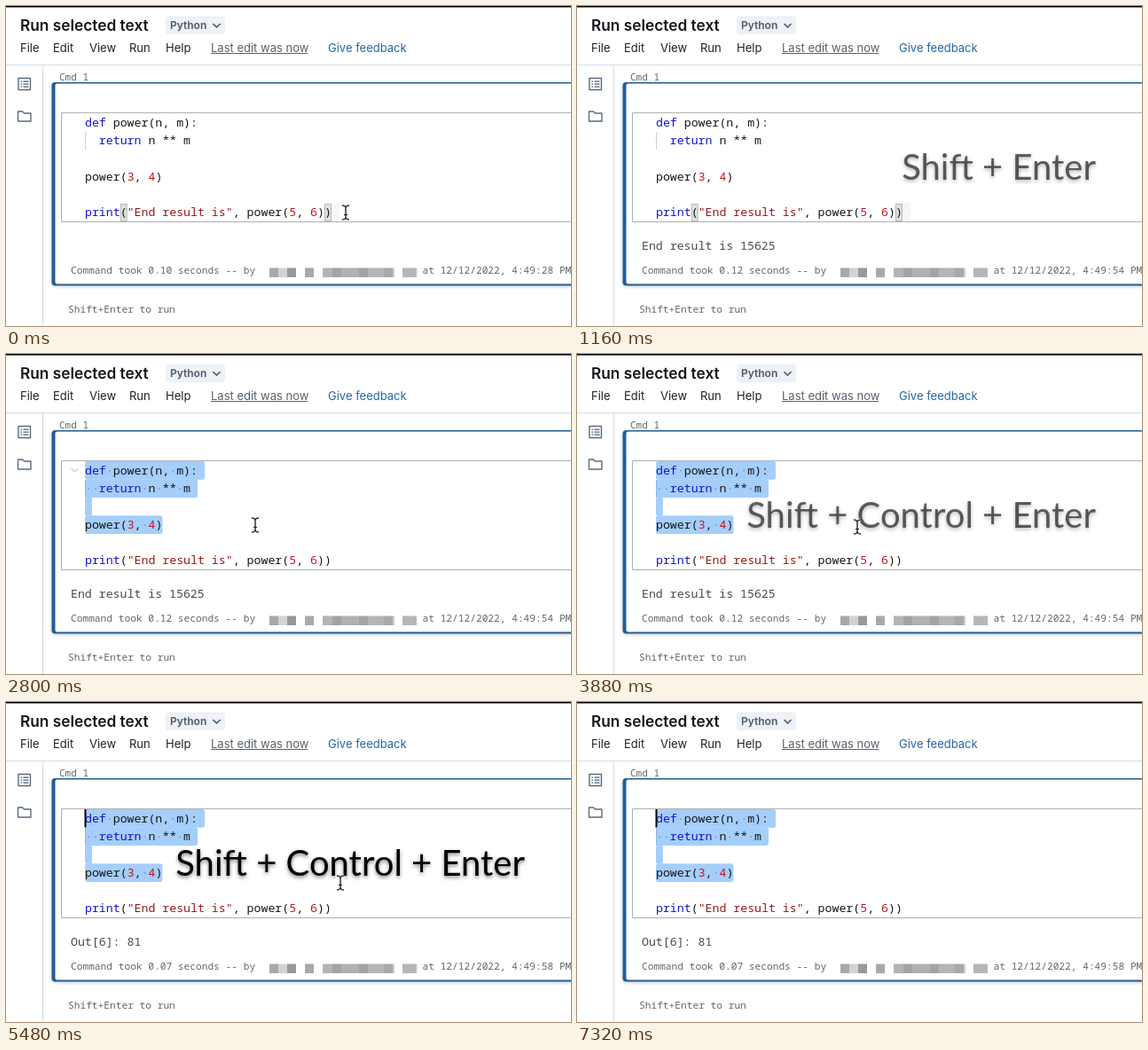
Write an HTML page with a canvas that moves like this. It is 637 px wide and 361 px high and loops after 7.44 s.

```html
<!DOCTYPE html>
<html lang="en">
<head>
<meta charset="utf-8">
<title>Run selected text</title>
<style>
html, body { margin: 0; width: 100%; height: 100%; overflow: hidden; background: #fff; }
canvas { display: block; width: 637px; height: 361px; }
</style>
</head>
<body>
<canvas id="stage" width="637" height="361"></canvas>
<script>
const ctx = document.getElementById('stage').getContext('2d');
const LOOP = 7440;
const MONO = '"Noto Sans Mono", "DejaVu Sans Mono", monospace';
const UI = 'Inter, Roboto, sans-serif';
const CODE_X = 89, CODE_Y = 121, LINE_H = 20.4, CHAR_W = 7.94;
const RUN_1 = 800, RUN_2 = 4600;
const DRAG_START = 1960, DRAG_END = 2360;

const BLUE = '#1414c8', RED = '#c8141e', STRING = '#981919', BLACK = '#161616';
// Each line is a list of [text, colour] runs.
const LINES = [
  [['def', BLUE], [' power(n, m):', BLACK]],
  [['  return', BLUE], [' n ** m', BLACK]],
  [],
  [['power(', BLACK], ['3', RED], [', ', BLACK], ['4', RED], [')', BLACK]],
  [],
  [['print', BLUE], ['(', BLACK], ['"End result is"', STRING], [', power(', BLACK],
   ['5', RED], [', ', BLACK], ['6', RED], ['))', BLACK]]
];
const PLAIN = LINES.map(runs => runs.map(r => r[0]).join(''));

// Pointer path: time, x, y
const PATH = [
  [0, 383, 233], [1480, 383, 233], [1800, 174, 187], [DRAG_START, 177, 191],
  [DRAG_END, 88, 131], [2480, 82, 131], [2800, 281, 193], [3300, 316, 195],
  [4700, 316, 195], [5400, 377, 204], [LOOP, 377, 204]
];

const clamp = (v, lo, hi) => Math.max(lo, Math.min(hi, v));
const ramp = (t, a, b) => clamp((t - a) / (b - a), 0, 1);
const smooth = p => p * p * (3 - 2 * p);
const fade = (t, a, b, c, d) => Math.min(ramp(t, a, b), 1 - ramp(t, c, d));

function rect(x, y, w, h, color) {
  ctx.fillStyle = color;
  ctx.fillRect(x, y, w, h);
}

function round(x, y, w, h, r, color) {
  ctx.fillStyle = color;
  ctx.beginPath();
  ctx.roundRect(x, y, w, h, r);
  ctx.fill();
}

function line(points, color, width = 1) {
  ctx.strokeStyle = color;
  ctx.lineWidth = width;
  ctx.beginPath();
  points.forEach(([x, y], i) => i ? ctx.lineTo(x, y) : ctx.moveTo(x, y));
  ctx.stroke();
}

function text(str, x, y, font, color) {
  ctx.font = font;
  ctx.fillStyle = color;
  ctx.fillText(str, x, y);
}

function drawHeader() {
  rect(0, 0, 637, 1.5, '#000');
  text('Run selected text', 16, 28, `600 17.3px ${UI}`, '#11171c');
  round(180, 11.5, 67, 20.5, 4, '#eef1f5');
  text('Python', 185, 26, `600 12px ${UI}`, '#4b5b6b');
  line([[233.5, 20], [237.5, 24], [241.5, 20]], '#4b5b6b', 1.7);
  const menu = [['File', 16], ['Edit', 53], ['View', 94], ['Run', 139], ['Help', 180]];
  for (const [name, x] of menu) text(name, x, 51.5, `13px ${UI}`, '#1c2329');
  text('Last edit was now', 231, 51.5, `13px ${UI}`, '#56616c');
  rect(231, 53, 109, 1, '#56616c');
  text('Give feedback', 363, 51.5, `13px ${UI}`, '#2566a5');
  rect(0, 66, 637, 1, '#d5dbe4');
}

function drawSidebar() {
  rect(41, 67, 1, 294, '#d5dbe4');
  ctx.strokeStyle = '#5a6b7d';
  ctx.lineWidth = 1.4;
  ctx.strokeRect(14, 81.5, 13.5, 13);
  for (let y = 85; y < 93; y += 3) {
    rect(16.5, y - 0.6, 1.6, 1.4, '#5a6b7d');
    rect(19.5, y - 0.6, 6, 1.4, '#5a6b7d');
  }
  ctx.lineJoin = 'round';
  ctx.beginPath();
  ctx.moveTo(13.5, 119);
  ctx.lineTo(18.5, 119);
  ctx.lineTo(20.5, 121);
  ctx.lineTo(28, 121);
  ctx.lineTo(28, 130);
  ctx.lineTo(13.5, 130);
  ctx.closePath();
  ctx.stroke();
}

function drawCell() {
  text('Cmd 1', 60, 83.5, `11px ${MONO}`, '#666');
  ctx.save();
  ctx.shadowColor = 'rgba(0,0,0,.22)';
  ctx.shadowBlur = 4;
  ctx.shadowOffsetY = 1;
  round(51.5, 86, 600, 229.5, 4, '#225d94');
  ctx.restore();
  round(55.5, 87.5, 600, 226, 2, '#fff');
  ctx.strokeStyle = '#b0b0b0';
  ctx.lineWidth = 1;
  ctx.strokeRect(62.5, 120.5, 600, 123);
  text('Shift+Enter to run', 70, 346, `11.2px ${MONO}`, '#666');
}

// Blurred-out user name
function drawMosaic() {
  const blocks = [
    [297, 10, '#a8a8a8'], [307, 10, '#d3d3d3'], [317, 10, '#999'],
    [337, 10, '#a9a9a9'], [357, 11, '#b4b4b4'], [368, 10, '#a3a3a3'],
    [378, 20, '#b1b1b1'], [398, 10, '#a4a4a4'], [408, 18, '#b5b5b5'],
    [426, 10, '#a9a9a9'], [436, 2, '#ccc'], [447, 16, '#b6b6b6']
  ];
  for (const [x, w, color] of blocks) rect(x, 295.5, w, 10.5, color);
}

function drawOutput(t) {
  const [out, took, sec] = t < RUN_1 ? ['', '0.10', '28']
    : t < RUN_2 ? ['End result is 15625', '0.12', '54']
    : ['Out[6]: 81', '0.07', '58'];
  text(out, 73, 274.5, `13.23px ${MONO}`, '#4a4a4a');
  const small = `11.2px ${MONO}`;
  text(`Command took ${took} seconds -- by`, 73, 302, small, '#666');
  text(`at 12/12/2022, 4:49:${sec} PM`, 469.5, 302, small, '#666');
  drawMosaic();
}

function pointer(t) {
  let i = 1;
  while (i < PATH.length - 1 && t > PATH[i][0]) i++;
  const [t0, x0, y0] = PATH[i - 1], [t1, x1, y1] = PATH[i];
  const p = smooth(ramp(t, t0, t1));
  return [x0 + (x1 - x0) * p, y0 + (y1 - y0) * p];
}

function caretPlace(t) {
  if (t < DRAG_START) return [5, PLAIN[5].length];
  const [x, y] = pointer(Math.min(t, DRAG_END));
  const row = clamp(Math.floor((y - CODE_Y) / LINE_H), 0, 3);
  return [row, clamp(Math.round((x - CODE_X) / CHAR_W), 0, PLAIN[row].length)];
}

function drawSelection(row, col) {
  for (let i = row; i < 4; i++) {
    const from = i === row ? col : 0;
    const to = PLAIN[i].length + (i < 3 ? 1 : 0);
    const x = CODE_X + from * CHAR_W, y = CODE_Y + i * LINE_H;
    round(x, y, (to - from) * CHAR_W, LINE_H + 0.3, 2.5, '#a5cefa');
    for (let c = from; c < PLAIN[i].length; c++) {
      if (PLAIN[i][c] === ' ')
        rect(CODE_X + (c + 0.5) * CHAR_W - 0.8, y + 10, 1.6, 1.6, '#7898b8');
    }
  }
}

function drawBracket(col) {
  const x = CODE_X + col * CHAR_W;
  rect(x, 223, 8, 20, '#b9b9b9');
  rect(x + 1, 224, 6, 18, '#dfe1df');
}

function drawCode(t) {
  const [row, col] = caretPlace(t);
  if (t >= DRAG_START) {
    drawSelection(row, col);
  } else {
    rect(367, 222, 9, 21, '#f4f6fa');
    drawBracket(5);
    drawBracket(34);
  }
  rect(89, 142, 1, 20, t < DRAG_START ? '#d0d0d0' : '#93b6da');
  LINES.forEach((runs, i) => {
    let c = 0;
    for (const [str, color] of runs) {
      text(str, CODE_X + c * CHAR_W, 135.7 + i * LINE_H * 0.995, `13.23px ${MONO}`, color);
      c += str.length;
    }
  });
  const hover = fade(t, 2360, 2480, 2760, 3160);
  if (hover > 0) {
    ctx.globalAlpha = hover;
    line([[73.5, 129], [77.5, 133], [81.5, 129]], '#c8ccd0', 1.2);
    ctx.globalAlpha = 1;
  }
  const odd = Math.floor(t / 500) % 2 === 1;
  if (odd === (t < DRAG_START))
    rect(CODE_X + col * CHAR_W - 0.5, CODE_Y + row * LINE_H, 2, 20.5, '#000');
}

function drawKeys(str, alpha) {
  if (alpha <= 0) return;
  ctx.save();
  ctx.globalAlpha = alpha;
  ctx.textAlign = 'right';
  ctx.shadowColor = 'rgba(0,0,0,.5)';
  ctx.shadowBlur = 4;
  ctx.shadowOffsetY = 2;
  text(str, 585, 195.5, '40px Lato, "Open Sans", sans-serif', '#000');
  ctx.restore();
}

function drawPointer(t) {
  if (t > 600 && t < 1480 || t > 6300) return;
  const [x, y] = pointer(t);
  for (const [color, width] of [['#fff', 3], ['#222', 1.4]]) {
    line([[x, y - 6.5], [x, y + 6.5]], color, width);
    for (const s of [-1, 1])
      line([[x - 4, y + s * 8], [x - 1.5, y + s * 7.6], [x, y + s * 6.2],
            [x + 1.5, y + s * 7.6], [x + 4, y + s * 8]], color, width);
  }
  line([[x - 2, y + 2.5], [x + 2, y + 2.5]], '#222', 1.2);
}

function draw(now) {
  const t = now % LOOP;
  rect(0, 0, 637, 361, '#fff');
  drawHeader();
  drawSidebar();
  drawCell();
  drawCode(t);
  drawOutput(t);
  drawKeys('Shift + Enter', fade(t, 100, 500, 1000, 1400));
  drawKeys('Shift + Control + Enter', fade(t, 3640, 4040, 6640, 7080));
  drawPointer(t);
}

let start = null;
function tick(now) {
  if (start === null) start = now;
  draw(now - start);
  requestAnimationFrame(tick);
}
draw(0);
requestAnimationFrame(tick);
</script>
</body>
</html>
```
